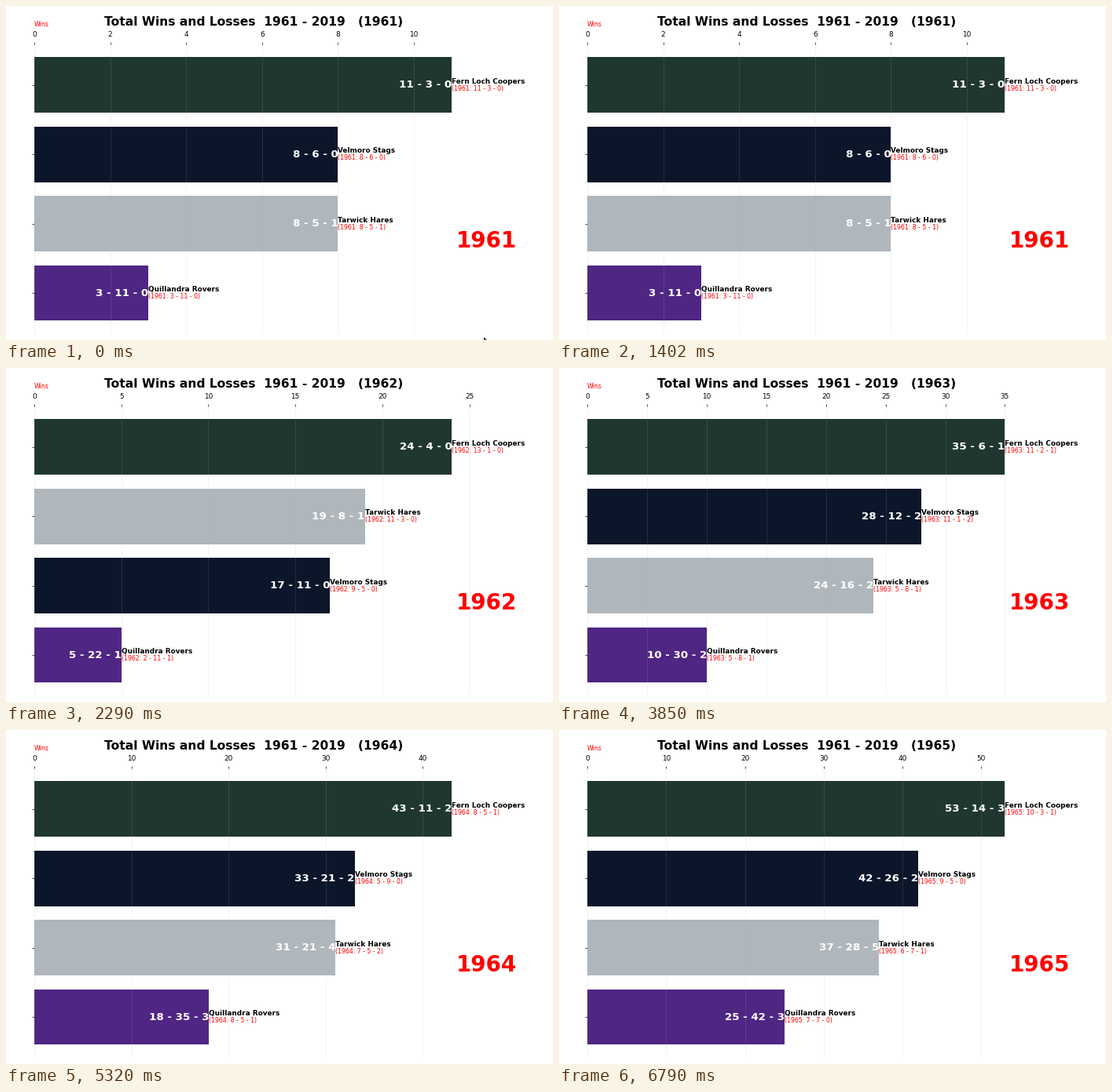
These frames come from a looping animation (696x426 px, 8 s). A matplotlib script:

```python
import matplotlib.pyplot as plt
import numpy as np
from matplotlib.animation import FuncAnimation
from matplotlib.patches import Polygon
from matplotlib.transforms import IdentityTransform

W, H, DPI = 696, 426, 40
STEP, LOOP = 20, 8000                    # ms
STARTS = [0, 2290, 3850, 5320, 6790]     # when each season appears, ms
CURSOR_END = 70
FIRST, GAMES = 1961, 14

# name, bar colour, wins and ties per season; losses fill up the schedule
TEAMS = [
    ("Fern Loch Coopers", "#203731", [11, 13, 11, 8, 10], [0, 0, 1, 1, 1]),
    ("Velmoro Stags", "#0B162A", [8, 9, 11, 5, 9], [0, 0, 2, 0, 0]),
    ("Tarwick Hares", "#B0B7BC", [8, 11, 5, 7, 6], [1, 0, 1, 2, 1]),
    ("Quillandra Rovers", "#4F2683", [3, 2, 5, 8, 7], [0, 1, 1, 1, 0]),
]

plt.rcParams["font.family"] = "DejaVu Sans"
fig = plt.figure(figsize=(W / DPI, H / DPI), dpi=DPI, facecolor="white")


def record(wins, ties, games):
    return f"{wins} - {games - wins - ties} - {ties}"


def pixel_text(x, y, text, **style):
    return fig.text(x / W, 1 - y / H, text, **style)


def season_axes(i):
    ax = fig.add_axes([36 / W, 7.8 / H, 558 / W, 369.6 / H], label=str(i))
    ranked = sorted(TEAMS, key=lambda team: -sum(team[2][:i + 1]))

    for y, (name, color, wins, ties) in enumerate(ranked):
        won, tied = sum(wins[:i + 1]), sum(ties[:i + 1])
        total = record(won, tied, GAMES * (i + 1))
        season = record(wins[i], ties[i], GAMES)
        ax.barh(y, won, height=0.8, color=color)
        ax.text(won, y, total, size=24, weight="bold", color="white",
                ha="right", va="center")
        ax.text(won, y, name, size=16, weight="bold", va="bottom")
        ax.text(won, y, f"({FIRST + i}: {season})", size=14, color="red",
                va="top")

    ax.set_xlim(0, sum(ranked[0][2][:i + 1]) * 1.05)
    ax.set_ylim(3.59, -0.59)
    ax.set_yticks(range(4), [""] * 4)
    ax.xaxis.tick_top()
    ax.tick_params(length=6, width=1.25, pad=8, labelsize=16)
    ax.set_axisbelow(False)
    ax.grid(axis="x", color="#b0b0b0", alpha=0.2, linewidth=1.4)
    ax.spines[:].set_visible(False)
    ax.patch.set_visible(False)
    return ax


seasons = [season_axes(i) for i in range(len(STARTS))]
title = pixel_text(315.5, 25, "", size=28, weight="bold", ha="center")
year = pixel_text(573, 308, "", size=50, weight="bold", color="red")
pixel_text(36, 26, "Wins", size=14, color="red")
cursor = fig.add_artist(Polygon(
    [(608.5, 2.8), (608.5, -8), (611, -5.5), (616.5, -5.2)],
    facecolor="white", edgecolor="black", linewidth=1.8,
    transform=IdentityTransform()))


def update(frame):
    t = (frame + 0.5) * STEP
    now = np.searchsorted(STARTS, t, side="right") - 1
    for i, ax in enumerate(seasons):
        ax.set_visible(i == now)
    title.set_text(f"Total Wins and Losses  1961 - 2019   ({FIRST + now})")
    year.set_text(str(FIRST + now))
    cursor.set_visible(t < CURSOR_END)
    return [*seasons, title, year, cursor]


anim = FuncAnimation(fig, update, frames=LOOP // STEP, interval=STEP,
                     repeat=True, blit=False)
plt.show()
```
